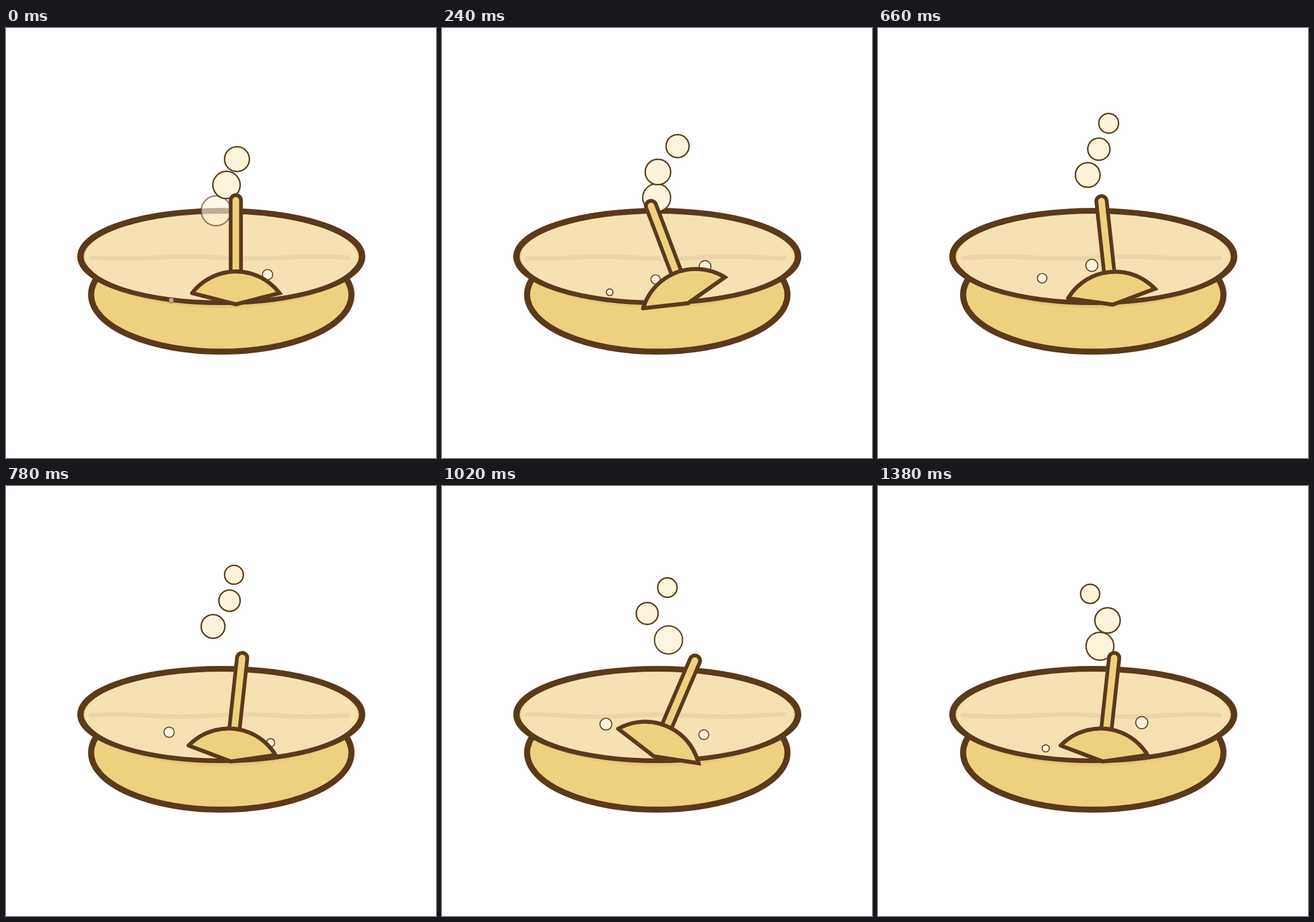
An HTML page with a canvas that plays this animation: 748x748 px, repeating every 1440 ms.

```html
<!DOCTYPE html>
<html lang="en">
<head>
<meta charset="utf-8">
<title>Stirring bowl</title>
<style>
  html, body { margin: 0; overflow: hidden; background: #fff; }
  canvas { display: block; }
</style>
</head>
<body>
<canvas id="stage" width="748" height="748"></canvas>
<script>
const ctx = document.getElementById('stage').getContext('2d');
const LOOP = 1440, STEP = 60, TAU = Math.PI * 2;
const DARK = '#5a3a1a', GOLD = '#efd080', SOUP = '#f6e1b2', FOAM = '#fff3dc';

function paint(fill, width) {
  if (fill) { ctx.fillStyle = fill; ctx.fill(); }
  if (width) { ctx.strokeStyle = DARK; ctx.lineWidth = width; ctx.stroke(); }
}

function ellipse(x, y, rx, ry, fill, width) {
  ctx.beginPath();
  ctx.ellipse(x, y, rx, ry, 0, 0, TAU);
  paint(fill, width);
}

function line(color, width, points) {
  ctx.beginPath();
  points.forEach(([x, y]) => ctx.lineTo(x, y));
  ctx.lineCap = ctx.lineJoin = 'round';
  ctx.strokeStyle = color;
  ctx.lineWidth = width;
  ctx.stroke();
}

function bubble(x, y, r, width, life) {
  ctx.globalAlpha = Math.min(1, 0.62 + 2 * life);
  ellipse(x, y, r, r, FOAM, width);
  ctx.globalAlpha = 1;
}

function drawBowl(t) {
  ellipse(374.5, 464, 226.5, 99, GOLD, 10.5);
  ellipse(374.5, 405, 233, 82, 'rgba(90,58,30,.06)');
  ellipse(374.5, 397.5, 245, 79, GOLD, 11);
  ellipse(374.5, 398.5, 237, 75.5, SOUP);
  const wave = Array.from({ length: 61 }, (_, i) => {
    const u = i / 60;
    return [148 + 446 * u, 399.4 + 1.8 * Math.sin(TAU * (2 * u + t))];
  });
  line('#ead6a8', 8, wave);
}

function drawBubbles(t) {
  for (let i = 0; i < 3; i++) {
    const p = (t * 1.33 + 0.355 * i) % 1;
    const x = 287.6 + 85.8 * i + 4.2 * Math.sin(6 * p + 0.15 * i);
    bubble(x, 473.7 - 63 * p, 4.6 + 6.1 * p, 1.7, p);
  }
  for (let i = 0; i < 3; i++) {
    const p = (t + 0.22 * i) % 1;
    const x = 365.4 + 18.2 * i + 8.7 * Math.sin(7 * p + 1.6 * i);
    bubble(x, 318 - 15 * i - 136 * p, 25.9 - 9.7 * p, 2.5, p);
  }
}

function drawSpoon(t) {
  const swing = Math.sin(TAU * t);
  ctx.save();
  ctx.translate(399.8 - 1.2 * swing, 398.7 + 4 * swing);
  ctx.rotate(-swing * 24 * Math.PI / 180);
  const handle = [[0, -99], [0, 30]];
  line(DARK, 24.5, handle);
  line(GOLD, 11.5, handle);
  ctx.beginPath();
  ctx.moveTo(0, 82);
  ctx.lineTo(-76, 62.5);
  ctx.arc(0, 120.6, 95.7, Math.PI + 0.653, TAU - 0.653);
  ctx.closePath();
  ctx.lineJoin = 'miter';
  paint(GOLD, 7);
  ctx.restore();
}

function frame(now) {
  const t = Math.floor(now % LOOP / STEP) * STEP / LOOP;
  ctx.fillStyle = '#fff';
  ctx.fillRect(0, 0, 748, 748);
  drawBowl(t);
  drawBubbles(t);
  drawSpoon(t);
  requestAnimationFrame(frame);
}

frame(performance.now());
</script>
</body>
</html>
```
